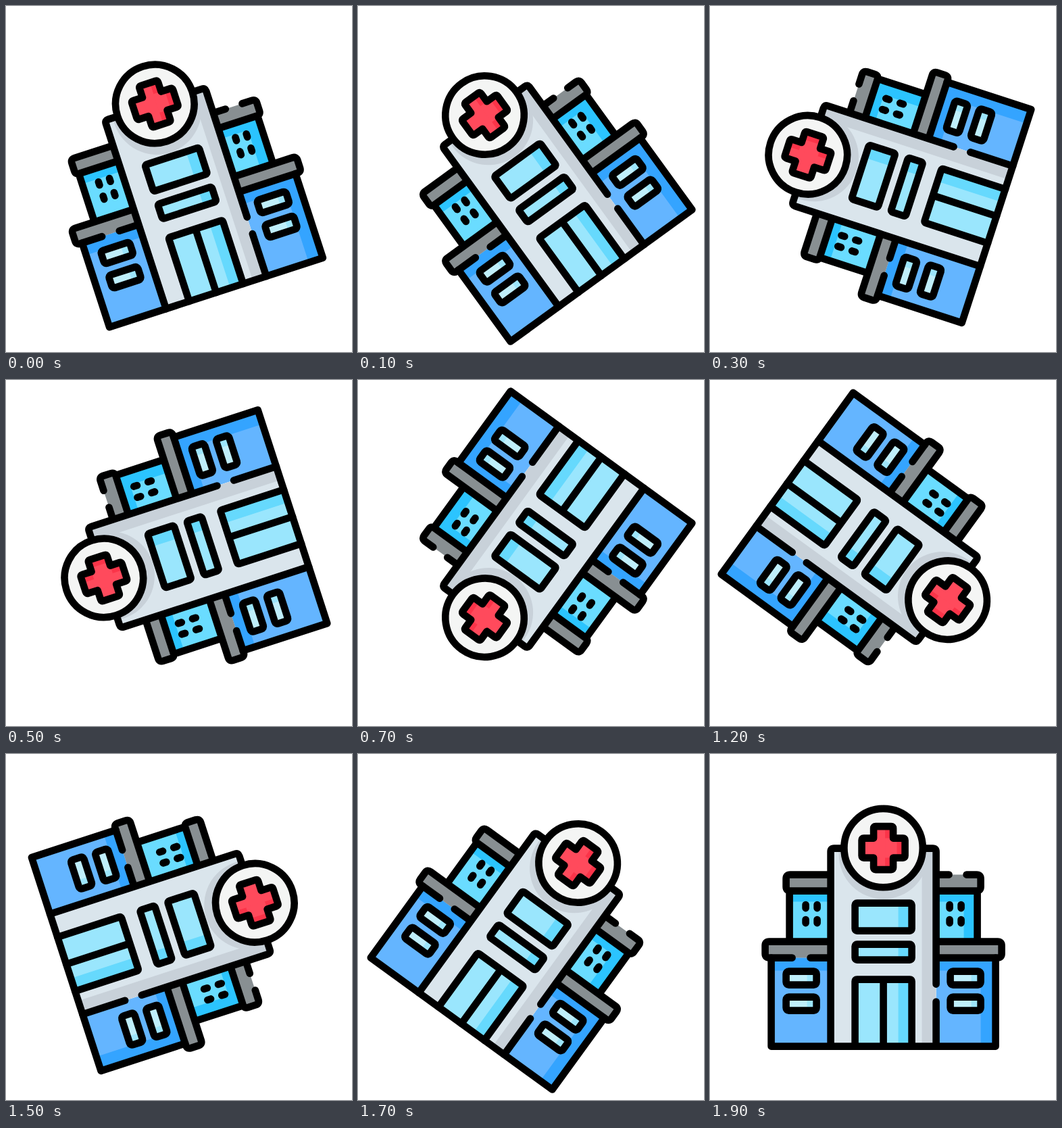
Recreate the animation shown at these times as an HTML page. Size 512 by 512 pixels, loop 2 s.

```html
<!DOCTYPE html>
<html lang="en">
<head>
<meta charset="utf-8">
<title>Spinning hospital</title>
<style>
  html, body { margin: 0; width: 100%; height: 100%; overflow: hidden; background: #fff; }
  svg { display: block; width: 100%; height: 100%; }
  .line { fill: none; stroke: #000; stroke-width: 10.6; stroke-linecap: round; stroke-linejoin: round; }
</style>
</head>
<body>
<svg viewBox="-0.6 -0.6 512 512">
  <defs>
    <clipPath id="towerClip"><path d="M178 139H334V432H178Z"/></clipPath>
    <path id="cross" d="M-11.5-32h23q3 0 3 3v14.500H29q3 0 3 3v23q0 3-3 3H14.500V29q0 3-3 3h-23q-3 0-3-3V14.500H-29q-3 0-3-3v-23q0-3 3-3h14.500V-29q0-3 3-3Z"/>
    <clipPath id="crossClip"><use href="#cross"/></clipPath>
    <g id="sideWindow">
      <rect width="45" height="20" fill="#bfeefa"/>
      <rect x="31" width="14" height="20" fill="#9de5fb"/>
      <rect class="line" width="45" height="20" rx="4"/>
    </g>
    <path id="dots" class="line" d="M0 0v5M17 0v5M0 22v5M17 22v5"/>
  </defs>
  <g id="hospital">
    <!-- upper wings -->
    <path fill="#6adcff" d="M117 202H178V277H117ZM334 202H395V277H334Z"/>
    <path fill="#2bc4ff" d="M117 202H178V218H117ZM334 202H395V277H375V218H334Z"/>
    <path fill="#888f92" d="M112 178H178V202H112ZM334 178H400V202H334Z"/>
    <path class="line" d="M117 202V277M395 202V277
      M178 178H118q-6 0-6 6v12q0 6 6 6H178
      M334 178H353M379 178H394q6 0 6 6v12q0 6-6 6H334"/>
    <use href="#dots" x="141" y="222.500"/>
    <use href="#dots" x="354" y="222.500"/>

    <!-- lower wings -->
    <path fill="#64b5ff" d="M90 301H178V432H90ZM334 301H422V432H334Z"/>
    <path fill="#34a4ff" d="M90 301H178V320H90ZM334 301H422V432H400V320H334Z"/>
    <path fill="#888f92" d="M81 277H178V301H81ZM334 277H431V301H334Z"/>
    <path class="line" d="M121 301H87q-6 0-6-6V283q0-6 6-6H178M148 301H178
      M334 277H425q6 0 6 6v12q0 6-6 6H334"/>
    <use href="#sideWindow" x="112" y="321"/>
    <use href="#sideWindow" x="112" y="359"/>
    <use href="#sideWindow" x="355" y="321"/>
    <use href="#sideWindow" x="355" y="359"/>

    <!-- tower -->
    <g clip-path="url(#towerClip)">
      <path fill="#dae5ec" d="M178 139H334V432H178Z"/>
      <path fill="#c8d1d9" d="M313 139H334V432H313Z"/>
      <circle cx="256" cy="148" r="66" fill="#c8d1d9"/>
    </g>
    <path fill="#9ae6fd" d="M214 220H298V261H214ZM214 281H298V304H214ZM214 333H298V432H214Z"/>
    <path fill="#66d9fd" d="M278 220H298V261H278ZM278 281H298V304H278ZM278 333H298V432H278Z"/>
    <g class="line">
      <rect x="214" y="220" width="84" height="41" rx="3"/>
      <rect x="214" y="281" width="84" height="23" rx="3"/>
      <path d="M214 432V336q0-3 3-3H295q3 0 3 3V432M256 333V432"/>
      <path d="M198 139H183q-5 0-5 5V432M314 139H329q5 0 5 5V340M334 366V432"/>
      <path d="M90 301V432H422V301"/>
    </g>

    <!-- sign -->
    <circle class="line" cx="256" cy="138.5" r="58.2" style="fill:#f4f5f4"/>
    <g transform="translate(256 138.5)">
      <use href="#cross" fill="#fb3449"/>
      <g clip-path="url(#crossClip)"><use href="#cross" x="-12" fill="#ff4a5c"/><path fill="#ff4a5c" d="M-15-32H2.500V32H-15Z"/></g>
      <use href="#cross" class="line"/>
    </g>
  </g>
</svg>
<script>
  const STEP_MS = 100, STEPS = 20;
  const hospital = document.getElementById('hospital');

  // One counter-clockwise turn per loop, in hard steps; the last step is upright.
  function draw() {
    const step = Math.floor(performance.now() / STEP_MS) % STEPS;
    hospital.setAttribute('transform', `rotate(${-(step + 1) * 360 / STEPS} 256 256)`);
    requestAnimationFrame(draw);
  }
  draw();
</script>
</body>
</html>
```
